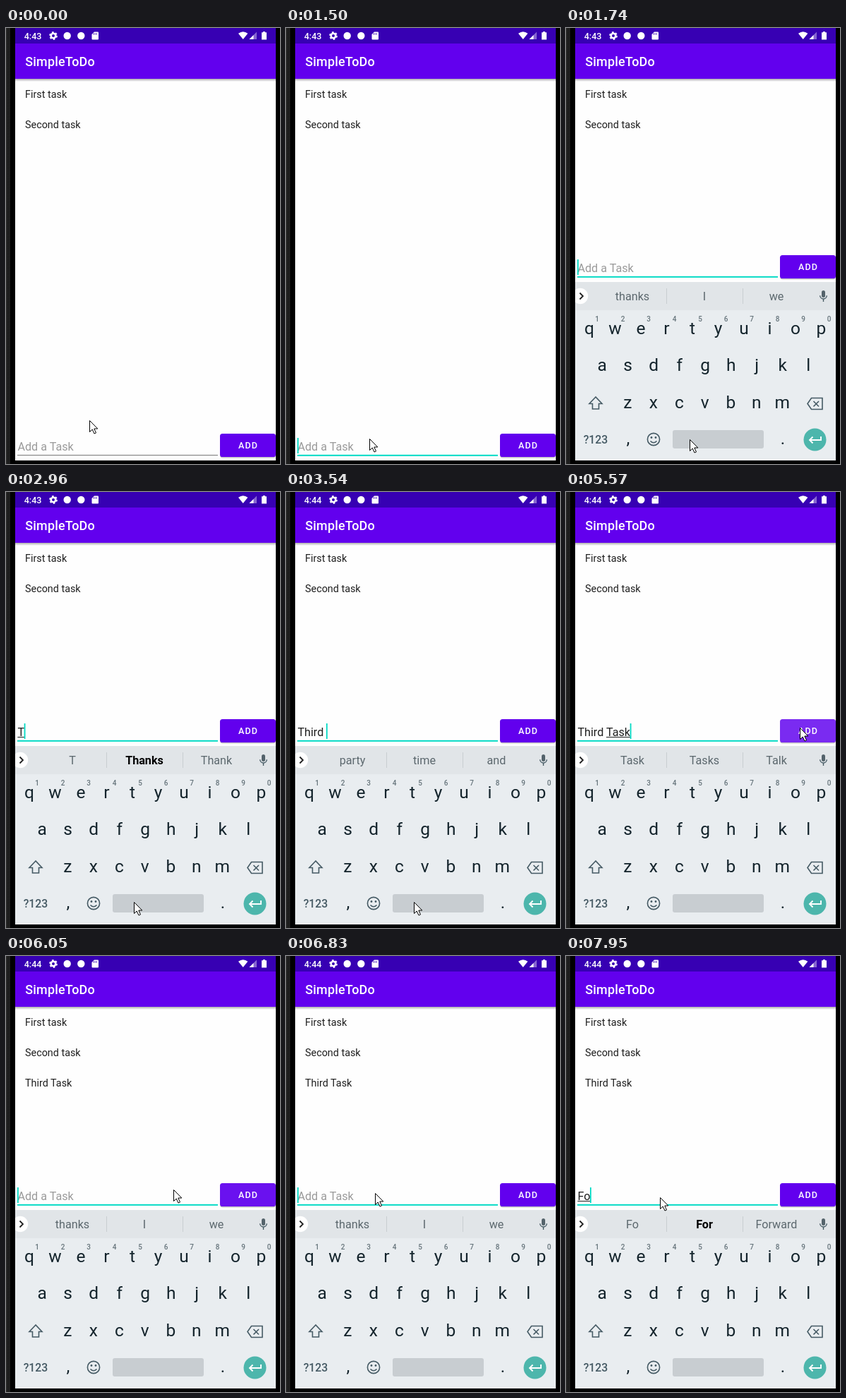
These frames come from a looping animation (388x618 px, 8 s). An HTML page:

```html
<!DOCTYPE html>
<html lang="en">
<head>
<meta charset="utf-8">
<title>To-do list</title>
<style>
  html, body { margin: 0; width: 100%; height: 100%; overflow: hidden; background: #000; }
  svg { display: block; width: 388px; height: 618px; font-family: Roboto, Arial, sans-serif; }
  text { white-space: pre; }
  .mid { text-anchor: middle; }
  .med { font-weight: 500; }
  .line { fill: none; stroke: #455a64; stroke-width: 1.6; }
</style>
</head>
<body>
<svg viewBox="0 0 388 618">
  <defs>
    <linearGradient id="edge">
      <stop offset="0" stop-color="#303030"/>
      <stop offset=".2" stop-color="#1a1a1a"/>
      <stop offset=".4" stop-color="#242424"/>
      <stop offset=".5" stop-color="#000"/>
    </linearGradient>
    <linearGradient id="drop" x2="0" y2="1">
      <stop offset="0" stop-color="#000" stop-opacity=".32"/>
      <stop offset="1" stop-color="#000" stop-opacity="0"/>
    </linearGradient>
    <clipPath id="screen"><rect x="13" width="369" height="613"/></clipPath>
  </defs>
  <rect width="388" height="618"/>
  <rect width="13" height="618" fill="url(#edge)"/>

  <g clip-path="url(#screen)">
    <rect x="13" width="369" height="613" fill="#fefefe"/>
    <rect x="13" y="72" width="369" height="4" fill="url(#drop)"/>
    <rect x="13" y="21" width="369" height="51" fill="#6200ee"/>
    <rect x="13" width="369" height="22" fill="#3700b3"/>
    <text class="med" x="27.2" y="53.5" font-size="17.95" letter-spacing=".22" fill="#fff">SimpleToDo</text>

    <g fill="#fff">
      <text id="clock" class="med" x="25.7" y="15.6" font-size="12.6"></text>
      <g fill="none" stroke="#fff">
        <circle cx="67" cy="11" r="3.3" stroke-width="2.6"/>
        <circle cx="67" cy="11" r="5" stroke-width="1.8" stroke-dasharray="2.6 2.636"/>
      </g>
      <circle cx="86.7" cy="11" r="5.2"/>
      <circle cx="106.3" cy="11" r="5.2"/>
      <path d="M125 5.5h5q1 0 1 1v9q0 1-1 1h-7.5q-1 0-1-1v-6.500z"/>
      <path d="M329 7.800Q335.700 2.600 342.400 7.800L335.700 16z"/>
      <path d="M355 5.500V16H344.500z" opacity=".4"/>
      <path d="M350.500 10V16H344.500z"/>
      <path d="M364 5h3v1.200h2V16.500h-7V6.200h2z"/>
    </g>
    <path d="M124 7.300v2.200M126.200 7.300v2.200M128.400 7.300v2.200" stroke="#3700b3" stroke-width="1"/>

    <g font-size="14.37" fill="#1f1f1f">
      <text x="27" y="98.800">First task</text>
      <text x="27" y="141.900">Second task</text>
      <text id="third" x="27" y="185">Third Task</text>
    </g>

    <g id="field">
      <rect id="rule" x="16" width="284"/>
      <text id="entry" x="16.400" y="599" font-size="16.160"></text>
      <rect id="under" y="600" height="1" fill="#222"/>
      <rect id="caret" y="581" width="1.800" height="22" fill="#03dac5"/>
      <rect x="303" y="576.500" width="79" height="33" rx="4" opacity=".22"/>
      <rect id="button" x="303" y="575" width="79" height="33" rx="3.600"/>
      <text class="med mid" x="343" y="596.300" font-size="12.570" letter-spacing="1.120" fill="#fff">ADD</text>
    </g>

    <g id="board">
      <rect x="13" y="360" width="369" height="253" fill="#e9edf0"/>
      <rect x="13" y="360" width="369" height="40" fill="#e1e5e8"/>
      <path d="M142.500 369v22M250.500 369v22" stroke="#c8cdd0"/>
      <circle cx="20" cy="380" r="11.200" fill="#fff"/>
      <path class="line" d="M19.500 375.500l4.500 4.500-4.500 4.500" style="stroke:#222;stroke-width:1.800"/>
      <g id="hints" class="mid" font-size="16.160"></g>
      <rect x="362" y="372" width="5" height="10" rx="2.500" fill="#54636b"/>
      <path class="line" d="M359.700 379.200a4.800 4.800 0 0 0 9.600 0M364.500 384v4" style="stroke-width:1.400"/>
      <g id="keys" class="mid" font-size="24.500" fill="#14242c"></g>
      <path class="line" d="M42 523l-9 9.500h4.500v7.500h9v-7.500h4.500z"/>
      <path class="line" d="M347.500 524.500h15.500v16h-15.500l-5.500-8zM350.500 529l7.500 7.500m0-7.500l-7.500 7.500"/>
      <text class="mid med" x="42" y="589" font-size="15.800" fill="#455a64">?123</text>
      <circle class="line" cx="124" cy="583" r="8.600"/>
      <path class="line" d="M119.500 585.500q4.500 4.500 9 0"/>
      <circle cx="121" cy="580.500" r="1.400" fill="#455a64"/>
      <circle cx="127" cy="580.500" r="1.400" fill="#455a64"/>
      <rect x="151" y="570" width="129" height="26" rx="3" fill="#c8cdd1"/>
      <circle cx="352.500" cy="583.500" r="16" fill="#4db6ac"/>
      <path class="line" d="M361 579v5h-16m4.500-4.500l-4.500 4.500 4.500 4.500" style="stroke:#fff;stroke-width:1.900"/>
    </g>
  </g>
  <path id="mouse" d="M.5.500V16.500L4.200 13l2.800 6 2.500-1.100-2.700-5.900h5z" fill="#fff" stroke="#000" stroke-width="1"/>
</svg>

<script>
const LOOP = 8000;
const $ = id => document.getElementById(id);
const set = (el, attrs) => { for (const k in attrs) el.setAttribute(k, attrs[k]); };

function addText(parent, text, x, y, attrs = {}) {
  const el = document.createElementNS('http://www.w3.org/2000/svg', 'text');
  set(el, { x, y, ...attrs });
  el.textContent = text;
  parent.append(el);
  return el;
}

const rows = [['qwertyuiop', 33, 434], ['asdfghjkl', 51.200, 486], ['zxcvbnm', 87.300, 539]];
for (const [letters, x, y] of rows)
  [...letters].forEach((c, i) => addText($('keys'), c, x + i * 36.500, y));
[...'1234567890'].forEach((c, i) =>
  addText($('keys'), c, 44 + i * 36.500, 416, { 'font-size': 10, class: 'med', fill: '#66747b' }));
addText($('keys'), ',', 88, 590);
addText($('keys'), '.', 307, 590);
const hints = [94, 196, 298].map(x => addText($('hints'), '', x, 386));

// Each row: start time, then the state held until the next row.
const mouse = [
  [0, 118, 556], [130, 151, 455], [270, 118, 330], [395, 73, 205], [520, 94, 131],
  [670, 89, 189], [820, 108, 462], [970, 110, 535], [1130, 117, 574], [1250, 118, 582],
  [1620, 145, 583], [1740, 175, 583], [2160, 178, 582], [2290, 181, 581], [5030, 177, 366],
  [5320, 240, 352], [5440, 308, 341], [5560, 331, 334], [5810, 327, 333], [5930, 292, 332],
  [6050, 237, 331], [6170, 169, 331], [6320, 134, 322], [6470, 128, 328], [6590, 126, 333],
  [6710, 126, 336], [7110, 133, 342]
];
// Typed text, start of the underlined word (-1: none), suggestions, bold middle.
const typing = [
  [0, '', -1, 'thanks I we'],
  [2960, 'T', 0, 'T Thanks Thank', true],
  [3110, 'Th', 0, 'Th The That', true],
  [3240, 'Thi', 0, 'Thi This Think', true],
  [3540, 'Third ', -1, 'party time and'],
  [4100, 'Third T', 6, 'T To Teachers'],
  [4380, 'Third Ta', 6, 'Ta Take Talk'],
  [4500, 'Third Task', 6, 'Task Tasks Talk'],
  [5690, '', -1, 'thanks I we'],
  [7680, 'F', 0, 'F For From', true],
  [7950, 'Fo', 0, 'Fo For Forward', true]
];
const blink = [
  [0, 0], [1370, 1], [2020, 0], [2560, 1], [5030, 0], [5440, 1],
  [6320, 0], [6830, 1], [7250, 0], [7680, 1]
];
const slide = [[0, 253], [1620, 110], [1740, 0]];
const tint = [
  [0, '#6200ee'], [5560, '#7a2bf1'], [5810, '#741ff0'], [5930, '#6f18f0'],
  [6050, '#6a11ef'], [6170, '#6200ee']
];
const at = (rows, t) => rows.findLast(r => r[0] <= t);

function draw(t) {
  const [, mx, my] = at(mouse, t);
  set($('mouse'), { transform: `translate(${mx} ${my})` });
  $('clock').textContent = t < 3540 ? '4:43' : '4:44';
  set($('third'), { visibility: t < 5690 ? 'hidden' : 'visible' });

  set($('board'), { transform: `translate(0 ${at(slide, t)[1]})` });
  set($('field'), { transform: `translate(0 ${t < 1620 ? 0 : -253})` });
  const focus = t >= 1370;
  set($('rule'), { y: focus ? 604.800 : 605, height: focus ? 2 : 1, fill: focus ? '#03dac5' : '#777' });
  set($('button'), { fill: at(tint, t)[1] });

  const [, text, from, words, bold] = at(typing, t);
  const entry = $('entry');
  entry.textContent = text || 'Add a Task';
  set(entry, { fill: text ? '#1f1f1f' : '#9a9a9a' });
  const width = n => n > 0 ? entry.getSubStringLength(0, n) : 0;
  const end = width(text.length), start = width(from);
  set($('under'), { x: 16.400 + start, width: from < 0 ? 0 : end - start });
  set($('caret'), { x: 16 + end, visibility: at(blink, t)[1] ? 'visible' : 'hidden' });

  words.split(' ').forEach((word, i) => {
    const strong = bold && i === 1;
    hints[i].textContent = word;
    set(hints[i], { fill: strong ? '#000' : '#5c686e', 'font-weight': strong ? 700 : 400 });
  });
}

const begin = performance.now();
function tick() {
  draw((performance.now() - begin) % LOOP);
  requestAnimationFrame(tick);
}
tick();
</script>
</body>
</html>
```
